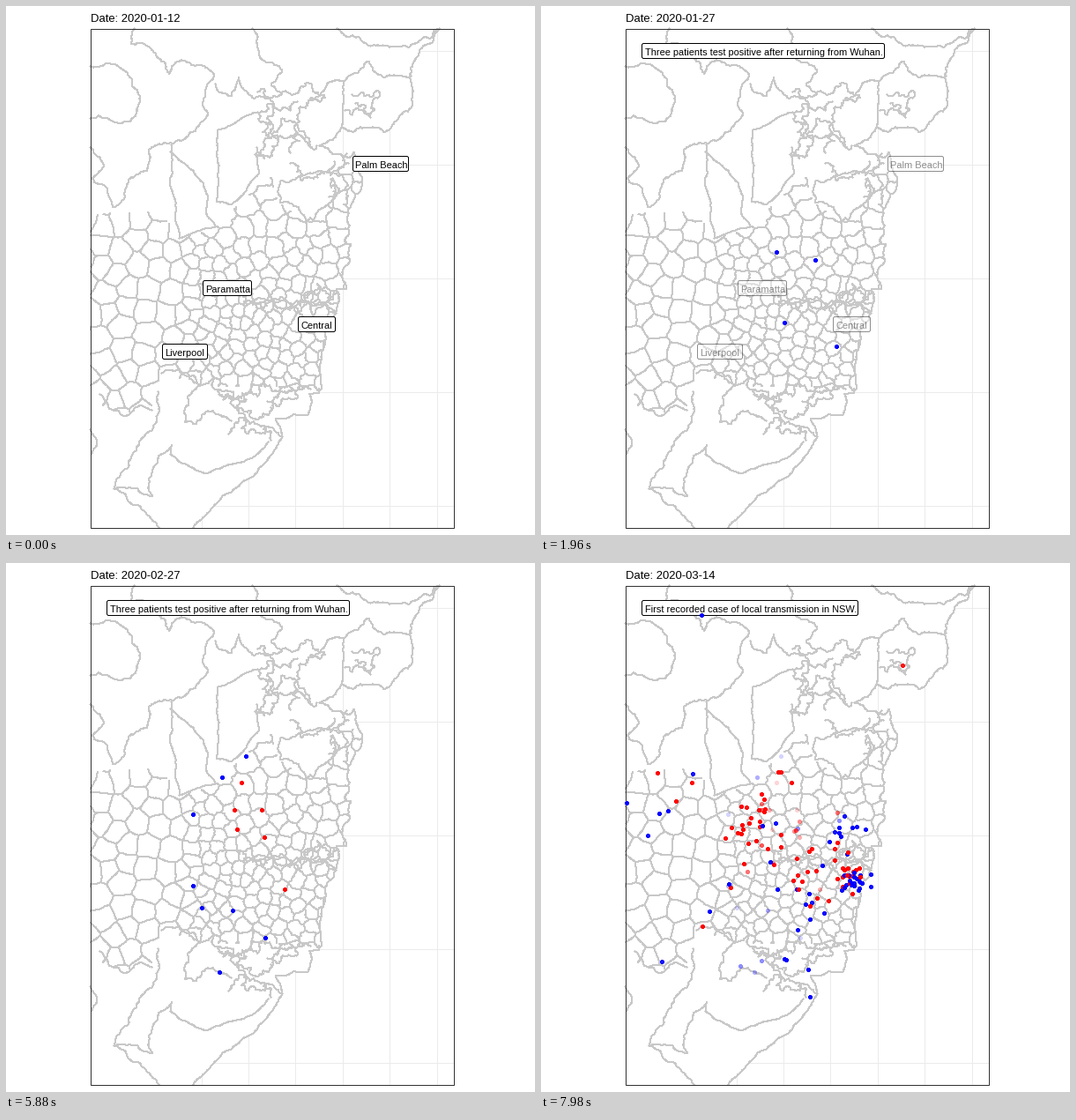
These frames come from a looping animation (600 by 600 pixels, 8000 ms). A matplotlib script:

```python
import numpy as np
import matplotlib.pyplot as plt
from matplotlib.animation import FuncAnimation
from matplotlib.patches import FancyBboxPatch, Rectangle
from matplotlib.path import Path
from matplotlib.tri import Triangulation

plt.rcParams["font.family"] = "Liberation Sans"
PX = 0.72               # points per pixel at 100 dpi
TICK, STEP, LOOP = 20, 140, 8000
WAKE = 17               # steps until a mark has faded out
L, T, R, B = 95, 25, 507, 591

rng = np.random.default_rng(11)
fig = plt.figure(figsize=(6, 6), dpi=100, facecolor="white")
ax = fig.add_axes([0, 0, 1, 1])
ax.set(xlim=(-0.5, 599.5), ylim=(599.5, -0.5))
ax.axis("off")
frame = Rectangle((L, T), R - L, B - T, fill=False, ec="#333333", lw=PX, zorder=5)
ax.add_patch(frame)
lines = []


def trace(points, amp=0.2):
    """Roughen a polyline by repeated midpoint displacement."""
    p = np.array(points, float)
    while True:
        d = np.diff(p, axis=0)
        cut = np.flatnonzero(np.hypot(*d.T) > 3)
        if not len(cut):
            return p
        shift = d[cut][:, ::-1] * [-1, 1] * rng.uniform(-amp, amp, (len(cut), 1))
        p = np.insert(p, cut + 1, p[cut] + d[cut] / 2 + shift, axis=0)


def border(*points, amp=0.19):
    lines.append(trace(points, amp))
    return lines[-1]


def inlet(*points):
    border(*points, amp=0.42)


# ---- coast and land ----
north = border((491, 25), (470, 48), (459, 69), (460, 100), (440, 131), (428, 143),
               (410, 137), (380, 137), (355, 158))
south = border((355, 158), (388, 172), (394, 165), (404, 195), (395, 215), (388, 230),
               (383, 266), (391, 270), (380, 306), (385, 321), (374, 320), (374, 346),
               (362, 381), (357, 420), (354, 439), (343, 439), (342, 463), (305, 468),
               (313, 488), amp=0.16)
cliffs = border((313, 488), (295, 516), (262, 545), (245, 555), (212, 591), amp=0.09)
land = np.vstack([north, south, cliffs, [(L, B), (L, T)]])

for x in np.linspace(221, 488, 6):
    ax.plot([x, x], [T, B], color="#ebebeb", lw=PX, zorder=0)
for y in np.linspace(50, 566, 5):
    ax.plot([L, R], [y, y], color="#ebebeb", lw=PX, zorder=0)
ax.fill(*land.T, color="white", lw=0, zorder=1)

# ---- large districts ----
border((145, 25), (142, 43), (185, 77), (187, 68), (219, 66), (236, 78), (222, 111),
       (229, 122), (207, 145), (187, 157))
border((279, 25), (284, 45), (313, 72), (300, 88), (312, 100))
border((237, 88), (256, 102), (263, 80), (272, 96), (295, 105), (312, 100))
border((375, 25), (400, 35), (440, 46), (470, 38), (490, 26))
border((345, 104), (384, 84), (411, 62), (420, 76), (459, 79))
border((383, 85), (380, 137), amp=0.08)
border((L, 68), (122, 66), (150, 100), (147, 124), (133, 131), (L, 127))
border((L, 160), (111, 181), (97, 195), (121, 228), (138, 200), (160, 186),
       (162, 162), (187, 155))
border((187, 155), (185, 200), (191, 241), (196, 263), amp=0.1)
border((186, 165), (229, 216), (226, 234), (237, 250), amp=0.1)
border((285, 120), (240, 140), (238, 221), (255, 225), (286, 190), (284, 160), amp=0.08)
border((372, 176), (311, 198), (310, 222), (345, 245), (368, 222), (370, 195))
border((196, 263), (237, 250), amp=0.05)
border((L, 480), (101, 489), (97, 507))
border((106, 440), (135, 465), (146, 455), (165, 458))
border((172, 437), (165, 481), (147, 504), (128, 534), (122, 547), (150, 566), (173, 591))
border((122, 547), (149, 547), (166, 556), (165, 529), (188, 497), (186, 508), amp=0.15)
border((186, 508), (205, 520), (225, 530), (270, 516), (297, 494), amp=0.09)
border((176, 416), (212, 418), (220, 430), (201, 460), (202, 471), (215, 474),
       (226, 460), (255, 470))

# ---- crinkled waterways ----
inlet((312, 100), (346, 88), (362, 104), (326, 136), (322, 166))
inlet((285, 97), (290, 142), (330, 136), (352, 158))
inlet((322, 178), (386, 167))
inlet((282, 168), (286, 122), (330, 108))
inlet((286, 168), (306, 150), (345, 160))
inlet((368, 196), (378, 208), (366, 216))
inlet((388, 178), (385, 205), (388, 230))
inlet((392, 100), (424, 98), (413, 126), (396, 110))
inlet((384, 118), (413, 126))
inlet((262, 327), (300, 333), (344, 336), (375, 325))
inlet((270, 337), (315, 344), (374, 348))
inlet((338, 336), (352, 314), (364, 334))
inlet((236, 421), (290, 428), (246, 446))
inlet((240, 435), (300, 455))
inlet((252, 485), (290, 484), (313, 488))
inlet((272, 446), (276, 474), (300, 492))
inlet((296, 448), (331, 443), (300, 458))
inlet((290, 428), (345, 434))

# ---- suburb mesh ----
suburbs = Path([
    (237, 250), (283, 203), (300, 192), (309, 222), (340, 243), (368, 222),
    (372, 185), (410, 190), (362, 436), (300, 432), (218, 430), (177, 416),
    (165, 455), (135, 465), (L, 446), (L, 236), (176, 232), (196, 263)])
coast = Path(land)


def spacing(x, y):
    if x < 205:
        return 19
    if y < 265:
        return 17
    return 10.5 if y > 318 else 13.5


def scatter_seeds():
    pts = np.empty((0, 2))
    for _ in range(7000):
        c = rng.uniform((65, 170), (420, 490))
        if not len(pts) or np.hypot(*(pts - c).T).min() > spacing(*c):
            pts = np.vstack([pts, c])
    return pts


def voronoi_edges(pts):
    tri = Triangulation(*pts.T)
    a, b, c = (pts[tri.triangles[:, i]] for i in range(3))
    b, c = b - a, c - a
    det = 2 * (b[:, 0] * c[:, 1] - b[:, 1] * c[:, 0])
    bb, cc = (b ** 2).sum(1), (c ** 2).sum(1)
    centre = a + np.column_stack([(c[:, 1] * bb - b[:, 1] * cc) / det,
                                  (b[:, 0] * cc - c[:, 0] * bb) / det])
    for i, row in enumerate(tri.neighbors):
        for j in row:
            if j > i and np.hypot(*(centre[i] - centre[j])) < 60:
                yield centre[i], centre[j]


for p, q in voronoi_edges(scatter_seeds()):
    edge = trace([p, q], 0.07 if p[0] < 205 else 0.18)
    inside = suburbs.contains_points(edge) & coast.contains_points(edge)
    edge[~inside] = np.nan
    if inside.any():
        lines.append(edge)

gap = np.full((1, 2), np.nan)
outline = np.vstack([part for line in lines for part in (line, gap)])
ax.plot(*outline.T, color="#c8c8c8", lw=PX, antialiased=False, zorder=2,
        clip_path=frame)


# ---- labels ----
def label(x, y, w, text):
    box = FancyBboxPatch((x, y), w, 17, boxstyle="round,pad=0,rounding_size=2",
                         fc="white", ec="black", lw=PX, zorder=6)
    ax.add_patch(box)
    words = ax.text(x + 3, y + 13.5, text, size=11 * PX, va="baseline", zorder=7)
    return box, words


places = [label(393, 170, 63, "Palm Beach"), label(223, 311, 55, "Paramatta"),
          label(331, 352, 42, "Central"), label(177, 383, 51, "Liverpool")]
notes = [
    (12, 45, label(114, 42, 275,
                   "Three patients test positive after returning from Wuhan.")),
    (45, 99, label(114, 42, 245,
                   "First recorded case of local transmission in NSW.")),
]
title = ax.text(95, 17, "", size=13 * PX, va="baseline")

# ---- cases: (step of appearance, x, y, colour channel) ----
RED, BLUE = 0, 2
draw = np.random.default_rng(5)
cases = []


def report(hue, spots, when):
    cases.extend((when(i), x, y, hue) for i, (x, y) in enumerate(spots))


def late(i):
    return 50 + i * 5 % 8


def cluster(hue, n, x, y, sx, sy):
    report(hue, draw.normal((x, y), (sx, sy), (n, 2)).round(), late)


report(BLUE, [(267, 279), (311, 288), (276, 359), (335, 386)], lambda i: 12)
report(BLUE, [(272, 219), (212, 285), (222, 391), (294, 425), (212, 366), (245, 243),
              (257, 394), (242, 464), (338, 292), (291, 301), (226, 457), (250, 451)],
       lambda i: 41 + i // 4)
report(RED, [(267, 249), (290, 280), (262, 302), (259, 280), (293, 311), (316, 370),
             (287, 304), (263, 340), (293, 293), (250, 273), (336, 283), (234, 350),
             (250, 280), (289, 303), (250, 320)], lambda i: 41 + i // 3)
report(BLUE, [(172, 239), (97, 272), (182, 59), (134, 284), (144, 281), (121, 309),
              (213, 364), (191, 395), (137, 452), (276, 449), (278, 450), (303, 461),
              (305, 492)], late)
report(RED, [(410, 116), (132, 238), (171, 249), (153, 270), (183, 412), (215, 368),
             (284, 249), (269, 237), (272, 237)], late)
cluster(RED, 24, 249, 306, 20, 22)
cluster(RED, 12, 294, 362, 13, 32)
cluster(RED, 15, 353, 360, 9, 11)
cluster(RED, 4, 332, 326, 9, 6)
cluster(BLUE, 20, 355, 360, 10, 6)
cluster(BLUE, 11, 344, 314, 15, 15)
cluster(BLUE, 9, 306, 378, 16, 14)
cluster(BLUE, 3, 258, 283, 8, 30)

born, xs, ys, hues = (np.array(v) for v in zip(*sorted(cases)))
rgba = np.zeros((len(cases), 4))
rgba[np.arange(len(cases)), hues] = 1
dots = ax.scatter(xs, ys, s=(4.3 * PX) ** 2, c=rgba, linewidths=0,
                  antialiased=False, zorder=8, clip_path=frame)


def fade(age):
    age = np.asarray(age)
    return np.where((age >= 0) & (age < WAKE), 1 - (age / WAKE) ** 3, 0.0)


def update(i):
    k = i * TICK // STEP
    title.set_text(f"Date: {np.datetime64('2020-01-12') + k * 109 // 99}")
    for place in places:
        for part in place:
            part.set_alpha(float(fade(k)))
            part.set_visible(k < WAKE)
    for start, end, note in notes:
        for part in note:
            part.set_visible(start <= k < end)
    rgba[:, 3] = fade(k - born)
    dots.set_facecolors(rgba)
    return []


anim = FuncAnimation(fig, update, frames=LOOP // TICK, interval=TICK, repeat=True,
                     repeat_delay=0, init_func=lambda: update(0))
plt.show()
```
